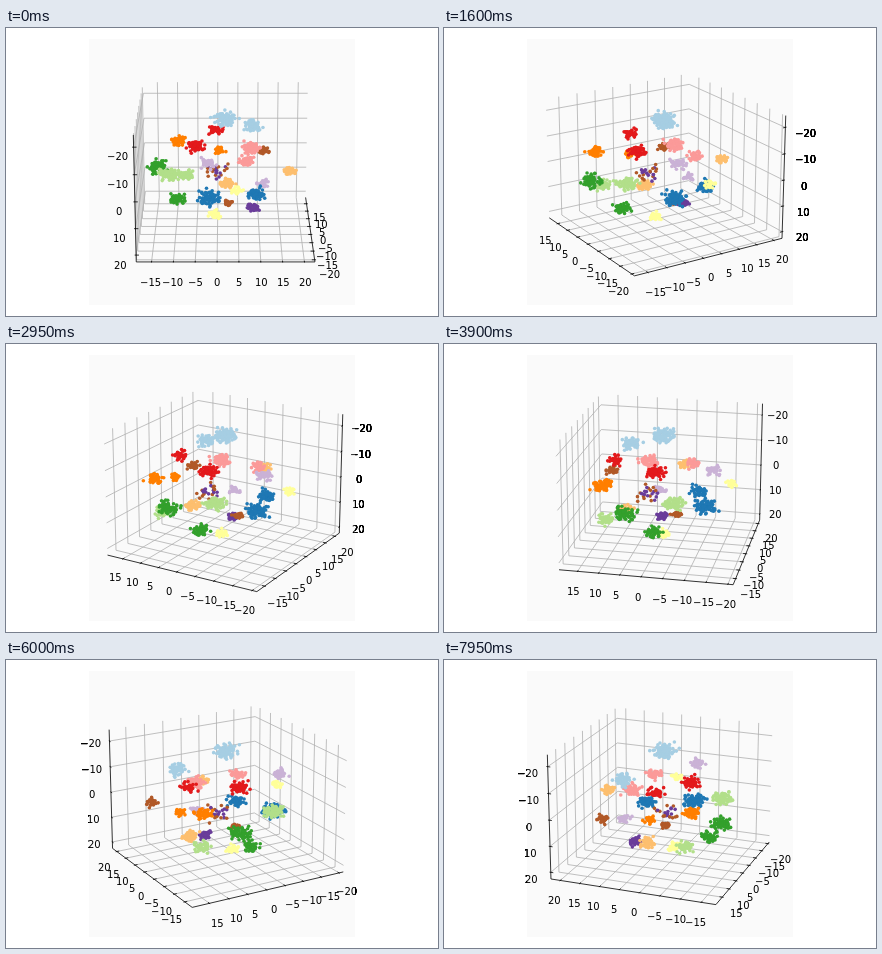
Write an HTML page with a canvas that moves like this. It is 432 px wide and 288 px high and loops after 8 s.

```html
<!DOCTYPE html>
<html lang="en">
<head>
<meta charset="utf-8">
<title>Rotating 3D scatter plot</title>
<style>
  html, body { margin: 0; width: 100%; height: 100%; overflow: hidden; background: #fff; }
  canvas { display: block; width: 432px; height: 288px; }
</style>
</head>
<body>
<canvas id="stage" width="432" height="288"></canvas>
<script>
const ctx = document.getElementById('stage').getContext('2d');
const STEP_MS = 50, STEPS = 160;
const ELEV = Math.PI / 9, SIN_E = Math.sin(ELEV), COS_E = Math.cos(ELEV);
const PANEL = { x: 83, y: 11, size: 266 };
const CENTER = { x: 219.6, y: 140.4 };
const FOCAL = 1440, DISTANCE = 10;
const SIDE = 0.5952;
const HALF = [SIDE, SIDE, SIDE * 0.75];
const PAD = 0.166; // label distance, as a share of the half size

const AXES = [
  { mid: 1.95, range: 40.9, dir: 1, step: 5 },
  { mid: -0.9, range: 40.6, dir: 1, step: 5 },
  { mid: -0.9, range: 47, dir: -1, step: 10 }
];

// Cluster centres per colour, in hundredths of the plot unit, largest first.
const CLUSTERS = {
  '#a6cee3': [[0, 1, 36], [19, 27, 22]],
  '#1f78b4': [[-11, -32, -10], [21, -21, -11]],
  '#b2df8a': [[-38, -15, 1], [-28, 34, -18]],
  '#33a02c': [[-48, 16, -5], [-34, 0, -23]],
  '#fb9a99': [[18, 14, 10], [14, -18, 12]],
  '#e31a1c': [[-20, 1, 16], [-7, 33, 18]],
  '#fdbf6f': [[2, 28, -22], [44, -6, 0]],
  '#ff7f00': [[-34, 36, 8], [-5, 39, 0]],
  '#cab2d6': [[-12, -37, 17], [26, 9, -14]],
  '#6a3d9a': [[19, 5, -31]],
  '#ffff99': [[-8, -1, -34], [8, -47, 1]],
  '#b15928': [[27, 44, -2], [2, -9, -22]]
};
const MIX = { center: [-6, 10, -5], colors: ['#6a3d9a', '#b15928'], count: 24 };

function seededRandom(seed) {
  return () => {
    seed = (seed + 0x6D2B79F5) | 0;
    let t = Math.imul(seed ^ (seed >>> 15), 1 | seed);
    t = (t + Math.imul(t ^ (t >>> 7), 61 | t)) ^ t;
    return ((t ^ (t >>> 14)) >>> 0) / 4294967296;
  };
}

const random = seededRandom(11);
const bell = () => (random() + random() + random() - 1.5) * 2;

const points = [];
function addPoint(color, [x, y, z], spread) {
  points.push({
    color,
    pos: [x + bell() * spread, y + bell() * spread, z + bell() * spread * 0.6].map(v => v / 100)
  });
}

// Clusters get smaller along the palette and within each colour.
Object.entries(CLUSTERS).forEach(([color, centers], hue) => {
  centers.forEach((center, rank) => {
    const spread = (3.6 - 0.14 * hue) * 0.8 ** rank;
    const count = 7 * spread * spread;
    for (let i = 0; i < count; i++) addPoint(color, center, spread);
  });
});
for (let i = 0; i < MIX.count; i++) addPoint(MIX.colors[i % 2], MIX.center, 4);

function makeCamera(azim) {
  const c = Math.cos(azim), s = Math.sin(azim);
  return ([x, y, z]) => {
    const near = x * c + y * s;
    const depth = near * COS_E + z * SIN_E;
    const scale = FOCAL / (DISTANCE - depth);
    return {
      x: CENTER.x + scale * (y * c - x * s),
      y: CENTER.y - scale * (z * COS_E - near * SIN_E),
      depth
    };
  };
}

function line(project, color, ...corners) {
  ctx.strokeStyle = color;
  ctx.beginPath();
  corners.map(project).forEach(p => ctx.lineTo(p.x, p.y));
  ctx.stroke();
}

function label(text, at) {
  const x = Math.round(at.x - ctx.measureText(text).width / 2);
  const y = Math.round(at.y + 7.7);
  ctx.fillText(text, x, y);

  // Text off the panel has hard, heavy edges.
  ctx.save();
  ctx.beginPath();
  ctx.rect(0, 0, 432, 288);
  ctx.rect(PANEL.x, PANEL.y, PANEL.size, PANEL.size);
  ctx.clip('evenodd');
  for (let i = 0; i < 5; i++) ctx.fillText(text, x, y);
  ctx.restore();
}

function axisTicks({ mid, range, dir, step }, half) {
  const ticks = [];
  const first = Math.ceil((mid - range / 2) / step) * step;
  for (let value = first; value <= mid + range / 2; value += step) {
    ticks.push({ value, at: dir * (value - mid) / range * 2 * half });
  }
  return ticks;
}

function drawAxes(project, farX, farY) {
  const fx = farX * SIDE, fy = farY * SIDE;
  const top = HALF[2], floor = -top;
  const edges = [
    v => [v, -fy, floor],
    v => [-fx, v, floor],
    v => [fx, -fy, v]
  ];
  const grids = [
    v => [[v, -fy, floor], [v, fy, floor], [v, fy, top]],
    v => [[-fx, v, floor], [fx, v, floor], [fx, v, top]],
    v => [[fx, -fy, v], [fx, fy, v], [-fx, fy, v]]
  ];
  const ticks = AXES.map((axis, i) => axisTicks(axis, HALF[i]));

  ctx.lineWidth = 0.8;
  ticks.forEach((list, i) => list.forEach(t => line(project, '#b0b0b0', ...grids[i](t.at))));

  ctx.fillStyle = '#000';
  ticks.forEach((list, i) => {
    const edge = edges[i], tickDir = i === 0 ? 1 : 0;
    line(project, '#000', edge(-HALF[i]), edge(HALF[i]));
    for (const { value, at } of list) {
      const base = edge(at);
      const scaled = factor => base.map((b, k) => k === tickDir ? b * factor : b);
      line(project, '#000', scaled(1.016), scaled(0.968));
      const out = base.map((b, k) => k === i ? b : b * (1 + PAD));
      label(String(value).replace('-', '\u2212'), project(out));
    }
  });
}

function drawPoints(project) {
  const dots = points.map(p => ({ color: p.color, ...project(p.pos) }));
  dots.sort((a, b) => a.depth - b.depth);
  for (const dot of dots) {
    ctx.fillStyle = dot.color;
    ctx.beginPath();
    ctx.arc(dot.x, dot.y, 1.8, 0, Math.PI * 2);
    ctx.fill();
  }
}

function draw(step) {
  const project = makeCamera((-90 - step) * Math.PI / 180);

  ctx.fillStyle = '#fff';
  ctx.fillRect(0, 0, 432, 288);
  ctx.fillStyle = '#fafafa';
  ctx.fillRect(PANEL.x, PANEL.y, PANEL.size, PANEL.size);
  ctx.font = '10px "DejaVu Sans", sans-serif';
  drawAxes(project, step > 0 ? 1 : -1, step <= 90 ? 1 : -1);
  drawPoints(project);
}

const start = performance.now();
function tick() {
  const elapsed = performance.now() - start;
  draw(Math.floor(elapsed / STEP_MS) % STEPS);
  requestAnimationFrame(tick);
}
tick();
</script>
</body>
</html>
```
